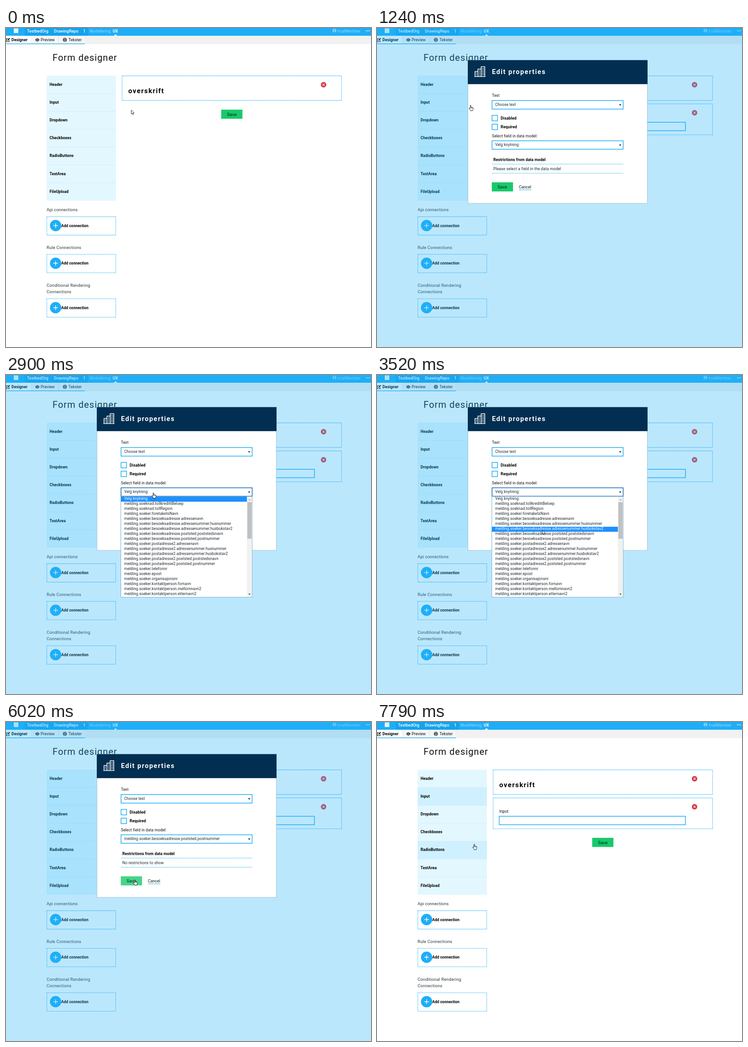
These frames come from a looping animation (800 px wide and 700 px high, 8 s). An HTML page:

```html
<!DOCTYPE html>
<html lang="en">
<head>
<meta charset="utf-8">
<title>Form designer</title>
<style>
  html, body { margin: 0; width: 100%; height: 100%; overflow: hidden; background: #fff; }
  svg { display: block; width: 800px; height: 700px; }
  text { font-family: Roboto, "Open Sans", sans-serif; white-space: pre; }
</style>
</head>
<body>
<svg id="stage" viewBox="0 0 800 700"></svg>
<script>
const BLUE = '#1eaef7', NAVY = '#022f51', GREEN = '#17c96b', INK = '#1f272c';
const LOOP = 8000, ROW = 11, LIST_TOP = 267;

const rect = (x, y, w, h, fill, more = '') =>
  `<rect x="${x}" y="${y}" width="${w}" height="${h}" fill="${fill}" ${more}/>`;
const path = (d, more) => `<path d="${d}" ${more}/>`;
const text = (x, y, s, { size = 8.5, weight = 400, fill = '#111', gap = 0.1, id = '' } = {}) =>
  `<text ${id && `id="${id}"`} x="${x}" y="${y}" font-size="${size}" font-weight="${weight}" fill="${fill}" letter-spacing="${gap}">${s}</text>`;
const bold = (x, y, s, more) => text(x, y, s, { weight: 700, fill: '#000', ...more });
const group = (id, body) => `<g id="${id}">${body}</g>`;
const outline = (x, y, w, h, id = '') =>
  rect(x, y, w, h, '#fff', `${id && `id="${id}"`} stroke="${BLUE}" stroke-width="1.5"`);
const DOTS = `stroke="${BLUE}" stroke-width="1.3" stroke-dasharray="1.3 1.3"`;
const dotted = (x, y, w, h) => rect(x, y, w, h, 'none', DOTS);
const triangle = (x, y, dir = 1, fill = '#000') =>
  path(`M${x - 2.5} ${y - 1.3 * dir}h5l-2.5 ${2.8 * dir}z`, `fill="${fill}"`);
const saveButton = (x, y, id = '') =>
  rect(x, y, 46.5, 20, GREEN, id && `id="${id}"`) +
  text(x + 12.7, y + 13.4, 'Save', { size: 9.8, fill: '#06251a', gap: 0 });

function topBar() {
  const pale = '#93d8fb', nav = { size: 9, weight: 500, fill: '#fff', gap: 0 };
  return rect(0, 0, 800, 17, BLUE) + rect(41, 0, 139, 17, '#14a3ee') +
    rect(17, 1, 10, 10, '#e6f6fe') +
    text(46, 9.5, 'TestbedOrg', nav) + text(105, 9.5, 'DrawingRepo', nav) +
    text(169, 9.5, '1', nav) +
    text(183, 9.5, 'Modellering', { size: 8.8, fill: pale, gap: 0 }) +
    bold(234, 9.5, 'UX', { size: 8.8, fill: '#fff', gap: 0 }) +
    path('M236.5 17l3.5-3.5 3.5 3.5z', 'fill="#fff"') +
    `<circle cx="720" cy="6" r="4.2" fill="${pale}"/><circle cx="720" cy="4.7" r="1.5" fill="${BLUE}"/>` +
    path('M717.3 8.7q2.7-3 5.4 0q-2.7 2-5.4 0z', `fill="${BLUE}"`) +
    text(727, 9.5, 'trialMember', { size: 9, fill: pale, gap: 0.15 }) +
    [790, 793, 796].map(x => `<circle cx="${x}" cy="6.2" r="1.1" fill="#d5f0fe"/>`).join('');
}

function tabs() {
  const line = 'fill="none" stroke="#111" stroke-width="1.2"';
  return rect(0, 17, 800, 18.5, '#f1f1f1') + rect(0, 17, 54.5, 18, '#fff') +
    rect(55, 17, 118, 17, '#f5f5f5') + rect(115, 17, 0.8, 17, '#dcdcdc') +
    rect(0, 34, 173, 1.3, BLUE) +
    path('M5 23.5H0.6V30H7V27', line) + path('M2.8 28l.5-2 4-4.2 1.5 1.4-4 4.2z', 'fill="#111"') +
    bold(12, 29, 'Designer', { size: 8.6 }) +
    path('M64 26q4.7-7 9.4 0q-4.7 7-9.4 0z', 'fill="#111"') +
    '<circle cx="68.7" cy="26" r="2.3" fill="#f5f5f5"/><circle cx="68.7" cy="26" r="1.4" fill="#111"/>' +
    text(76, 29, 'Preview', { size: 8.8, gap: 0 }) +
    '<circle cx="129" cy="26" r="4.4" fill="#111"/>' +
    path('M124.6 24.5h8.8M124.6 27.6h8.8M129 21.6v8.8M129 21.6q-4 4.4 0 8.8q4-4.4 0-8.8',
      'fill="none" stroke="#f5f5f5" stroke-width=".6"') +
    text(137, 29, 'Tekster', { size: 8.8, gap: 0 });
}

function sidebar() {
  const step = 39.2;
  const names = ['Header', 'Input', 'Dropdown', 'Checkboxes', 'RadioButtons', 'TextArea', 'FileUpload'];
  const items = names.map((name, i) => {
    const y = 104.6 + i * step;
    return rect(89, y, 152, step, '#e3f7ff', `id="item${i}"`) +
      (i ? rect(89, y - 0.5, 152, 1, '#d2eefb') : '') + bold(95.5, y + 22, name);
  }).join('');
  const label = { size: 9.3, fill: '#2a343a', gap: 0.22 };
  const add = y => dotted(89.5, y - 19.5, 151, 40.5) +
    `<circle cx="108.7" cy="${y}" r="12.4" fill="${BLUE}"/>` +
    path(`M103.7 ${y}h10M108.7 ${y - 5}v10`, 'stroke="#fff" stroke-width="1.4"') +
    bold(121, y + 3, 'Add connection', { size: 8.4, gap: 0.06 });
  return items +
    text(89, 402, 'Api connections', { ...label, gap: 0.1 }) + add(433.5) +
    text(89, 484.7, 'Rule Connections', label) + add(516.2) +
    text(89, 567.5, 'Conditional Rendering', label) + text(89, 582, 'Connections', label) + add(613.7);
}

function canvas() {
  const remove = y => `<circle cx="696" cy="${y}" r="5.9" fill="#d9363e"/>` +
    path(`M693.7 ${y - 2.3}l4.6 4.6m0-4.6l-4.6 4.6`, 'stroke="#fff" stroke-width="1.2"');
  return text(102, 72, 'Form designer', { size: 20, gap: 1.05 }) +
    dotted(254.5, 105, 481, 54) + bold(268, 143, 'overskrift', { size: 15, gap: 1.4 }) + remove(124.5) +
    group('before', saveButton(471.7, 179.2)) +
    group('after', dotted(254.5, 166.5, 481, 67.8) + text(268, 198.7, 'Input', { size: 8.7 }) +
      outline(267.7, 206.8, 408.3, 18.6) + remove(186) + saveButton(471.7, 254.2));
}

function dialog() {
  const small = { size: 8.4, fill: INK, gap: 0.1 };
  const rule = y => path(`M252 ${y}h288`, DOTS);
  const check = (y, name) => outline(252.2, y, 12, 12) + bold(271, y + 9, name, { size: 8.7 });
  return rect(199.3, 70.5, 393.2, 314.3, '#fff', 'stroke="#9bb9c9" stroke-width=".8"') +
    rect(199, 70.5, 394, 52.7, NAVY) +
    path('M214.8 106.5V95.5h6.5M221.3 106.5V90.3h7M228.3 106.5V85h8v21.5M213.5 106.6h24',
      'fill="none" stroke="#fff" stroke-width="1.5"') +
    path('M218 98v7M224.8 93v12M230.9 88v17M233.8 88v17',
      'stroke="#fff" stroke-width="1.3" stroke-dasharray="2.2 1.2"') +
    bold(252, 101, 'Edit properties', { size: 14.5, fill: '#fff', gap: 1.5 }) +
    text(252, 151.3, 'Text') +
    outline(252.2, 159.2, 287.3, 18.8) + text(259, 171, 'Choose text', small) + triangle(533, 168.8) +
    check(191.7, 'Disabled') + check(211, 'Required') +
    text(252, 239.5, 'Select field in data model:', { gap: 0.08 }) +
    outline(252.2, 247.5, 287.3, 18.6, 'field') +
    text(259, 259.2, '', { ...small, id: 'value' }) + triangle(533, 257) +
    bold(255, 291.7, 'Restrictions from data model', { size: 8.6, gap: 0.08 }) + rule(298.7) +
    text(255, 311.5, '', { fill: INK, gap: 0.13, id: 'limits' }) + rule(318.6) +
    saveButton(251.6, 338.6, 'confirm') +
    text(311, 352, 'Cancel', { size: 8.8, gap: 0 }) + rect(311, 354.6, 27, 1, BLUE);
}

const besok = 'soeker.besoeksadresse.', post = 'soeker.postadresse2.', person = 'soeker.kontaktperson.';
const address = base => ['adressenavn', 'adressenummer.husnummer', 'adressenummer.husbokstav2',
  'poststed.poststedsnavn', 'poststed.postnummer'].map(end => base + end);
const options = ['Velg knytning:', ...[
  'soeknad.tollkredittBeloep', 'soeknad.tollRegion', 'soeker.foretaketsNavn',
  ...address(besok), ...address(post),
  'soeker.telefonnr', 'soeker.epost', 'soeker.organisajonsnr',
  person + 'fornavn', person + 'mellomnavn2', person + 'etternavn2'
].map(key => 'melding.' + key)];

function dropdown() {
  return rect(251.7, 266.5, 288, 221.2, '#fff', 'stroke="#5fa5d2" stroke-width=".9"') +
    rect(252, 0, 276, ROW, '#1e90ff', 'id="mark"') +
    options.map((name, i) =>
      text(259, LIST_TOP + 7.2 + i * ROW, name, { size: 8.4, fill: INK, id: 'opt' + i })).join('') +
    rect(528, 267, 11.2, 220.3, '#f1f1f1') + rect(529, 279, 9.4, 80.3, '#c1c1c1') +
    triangle(533.7, 273.8, -1, '#a3a3a3') + triangle(533.7, 481, 1, '#444');
}

const pointers =
  path('M.6.7V9.6L2.7 7.7 4.1 10.8 5.5 10.1 4.2 7.2H6.8Z',
    'id="arrow" fill="#fff" stroke="#1c1c38" stroke-width=".9" stroke-linejoin="round"') +
  group('hand', path('M3.2 8V1.6Q3.2.6 4.1.6T5 1.6V5Q5.8 4.3 6.5 5.2Q7.5 4.6 8 5.6Q9.6 5 9.7 6.7V9Q9.6 10.6 8.7 11.4V12.6H4V11.6L.9 8.1Q.4 7 1.3 6.7Q2.2 6.7 3.2 8Z',
    'fill="#fff" stroke="#111" stroke-width=".9" stroke-linejoin="round"') +
    path('M5 5v2M6.5 5.2v2M8 5.6v1.8', 'stroke="#111" stroke-width=".6"'));

document.getElementById('stage').innerHTML =
  rect(0, 0, 800, 700, '#fff') + topBar() + tabs() + sidebar() + canvas() +
  group('modal', rect(0, 0, 800, 700, BLUE, 'opacity=".3"') + dialog()) +
  group('list', dropdown()) + group('pointer', pointers);

// Each step keeps its state until the next one begins.
const page = { lit: [] }, edit = { ...page, modal: true, added: true };
const open = row => ({ ...edit, focus: true, row });
const picked = { ...edit, picked: true }, done = { lit: [1], added: true };
const steps = [
  [0, 'arrow', 274, 179.3, page],
  [620, 'hand', 206, 171, { lit: [1] }],
  [930, 'hand', 201, 169, { lit: [1] }],
  [1240, 'hand', 201, 169, edit],
  [1870, 'hand', 310, 242.5, edit],
  [2160, 'hand', 319, 257.8, { ...edit, focus: true }],
  [2900, 'hand', 319, 257.8, open(0)],
  [3210, 'arrow', 340, 315, open(4)],
  [3520, 'arrow', 362, 340, open(6)],
  [3830, 'arrow', 380, 353, open(7)],
  [4450, 'arrow', 392, 356.8, open(8)],
  [4760, 'arrow', 392, 356.8, { ...picked, focus: true }],
  [5070, 'arrow', 303, 345, { ...picked, focus: true }],
  [6020, 'hand', 278, 345.5, { ...picked, press: true }],
  [6280, 'hand', 278, 345.5, done],
  [6860, 'arrow', 283, 336, done],
  [7170, 'arrow', 278, 342, done],
  [7480, 'arrow', 269, 327, done],
  [7790, 'hand', 209, 267.5, { lit: [1, 4], added: true }]
];

const el = id => document.getElementById(id);
const show = (id, on) => el(id).setAttribute('display', on ? 'inline' : 'none');
const paint = (id, name, value) => el(id).setAttribute(name, value);

function draw([, kind, x, y, s]) {
  const isOpen = s.row !== undefined;
  show('before', !s.added);
  show('after', s.added);
  show('modal', s.modal);
  show('list', isOpen);
  show('arrow', kind === 'arrow');
  show('hand', kind === 'hand');
  paint('pointer', 'transform', `translate(${x} ${y})`);
  for (let i = 0; i < 7; i++) paint('item' + i, 'fill', s.lit.includes(i) ? '#cff0ff' : '#e3f7ff');
  paint('field', 'stroke', s.focus ? '#0f68b5' : BLUE);
  paint('confirm', 'fill', s.press ? '#45d589' : GREEN);
  el('value').textContent = options[s.picked ? 8 : 0];
  el('limits').textContent = s.picked ? 'No restrictions to show' : 'Please select a field in the data model';
  if (isOpen) {
    paint('mark', 'y', LIST_TOP + s.row * ROW);
    options.forEach((_, i) => paint('opt' + i, 'fill', i === s.row ? '#fff' : INK));
  }
}

const start = performance.now();
let current;
function tick() {
  const t = (performance.now() - start) % LOOP;
  const step = steps.findLast(([at]) => at <= t);
  if (step !== current) draw(current = step);
  requestAnimationFrame(tick);
}
tick();
</script>
</body>
</html>
```
